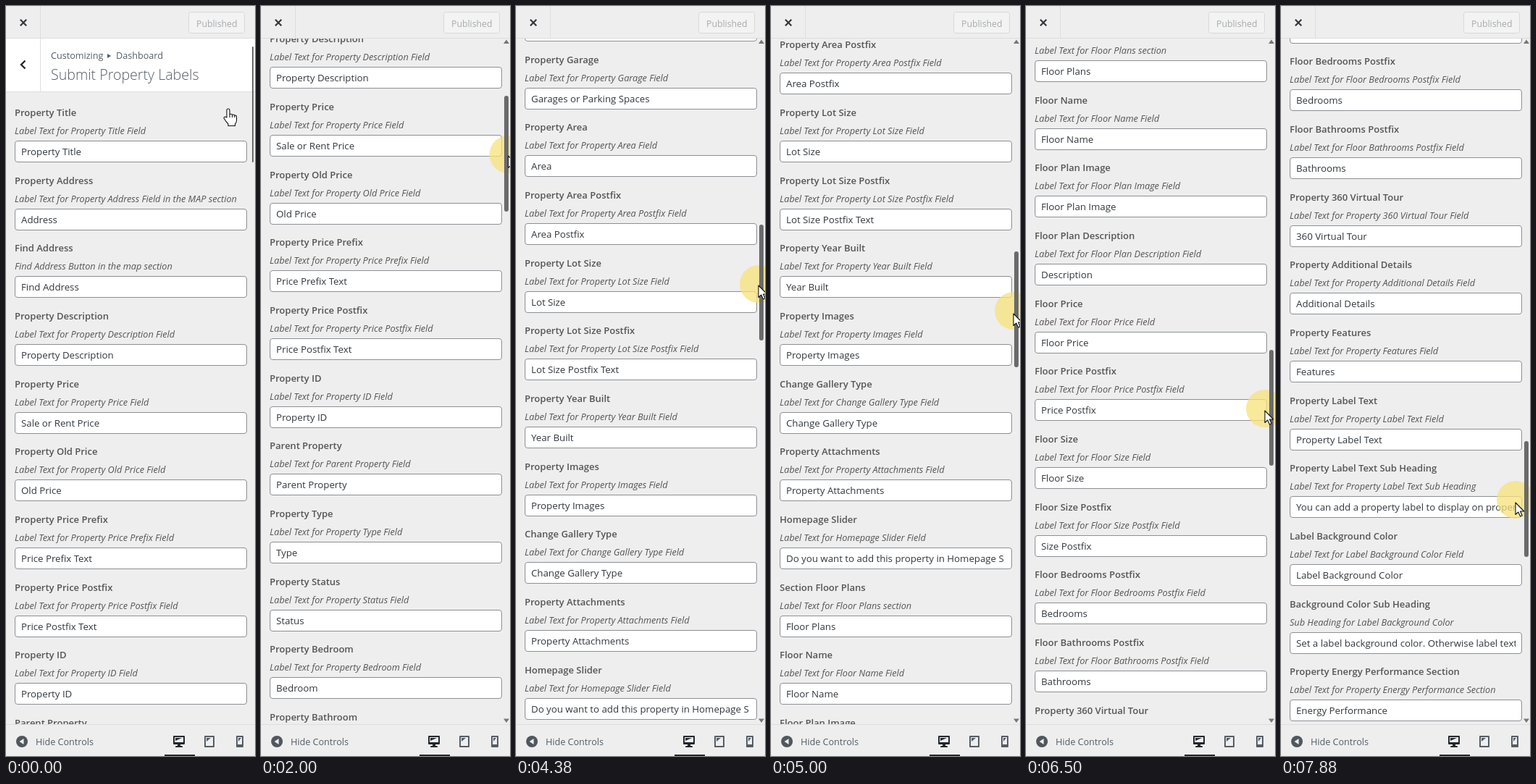
These frames come from a looping animation (344 px wide and 1036 px high, 8000 ms). An HTML page:

```html
<!DOCTYPE html>
<html lang="en">
<head>
<meta charset="utf-8">
<title>Label settings</title>
<style>
  html, body { margin: 0; width: 100%; height: 100%; overflow: hidden; background: #eee; }
  svg { display: block; font-family: "Open Sans", "Noto Sans", sans-serif; fill: #555d66; }
  .title { font-size: 13px; font-weight: 600; fill: #555; }
  .desc { font-size: 12.7px; font-style: italic; fill: #555; }
  .value { font-size: 13.25px; fill: #32373c; }
  .box { fill: #fff; stroke: #8c8f94; }
  .small { font-size: 12.6px; }
  .line { stroke: #ddd; fill: none; }
  .dark { fill: #23282d; }
  .halo { fill: #f7e27a; opacity: .75; }
  .cursor { fill: #fff; stroke: #111; stroke-width: 1.1; stroke-linejoin: round; }
</style>
</head>
<body>
<svg width="344" height="1036" viewBox="0 0 344 1036">
  <defs>
    <clipPath id="field"><rect x="13" y="187" width="311.5" height="28"/></clipPath>
  </defs>
  <rect width="344" height="1036" fill="#eee"/>
  <g id="list"></g>

  <g id="head">
    <rect y="44" width="344" height="74" fill="#fff"/>
    <path class="line" d="M0 118.5H344M47.5 44V118"/>
    <path d="M26.5 75.5L21 81L26.5 86.5" fill="none" stroke="#23282d" stroke-width="2.4"/>
    <text class="small" x="62" y="73">Customizing</text>
    <path d="M140 66L145 69L140 72Z"/>
    <text class="small" x="152" y="73">Dashboard</text>
    <text x="62" y="102" font-size="19.6" font-weight="300">Submit Property Labels</text>
  </g>

  <circle id="halo" class="halo" r="26"/>
  <g id="bar">
    <rect id="thumb" fill="#6a6a6a"/>
    <g id="arrows" fill="#777">
      <path d="M335 52L339 46.5L343 52Z"/>
      <path d="M335 984.5L339 990L343 984.5Z"/>
    </g>
  </g>

  <rect width="344" height="44" fill="#eee"/>
  <path class="line" d="M0 44.5H344M47.5 0V44"/>
  <path d="M19.8 18.8L28.2 27.2M28.2 18.8L19.8 27.2" stroke="#32373c" stroke-width="2.2"/>
  <rect x="252.5" y="8.5" width="77" height="29" rx="3" fill="#f3f3f3" stroke="#d8d8d8"/>
  <text x="263" y="28.5" font-size="12.3" fill="#a7aaad">Published</text>

  <rect y="992" width="344" height="44" fill="#eee"/>
  <path class="line" d="M0 992.5H344"/>
  <circle cx="22" cy="1016" r="8" fill="#50575e"/>
  <path d="M24.5 1012V1020L18.5 1016Z" fill="#eee"/>
  <text class="small" x="41" y="1021">Hide Controls</text>
  <g class="dark">
    <path fill-rule="evenodd" d="M232 1008H246Q247 1008 247 1009V1019Q247 1020 246 1020H241V1022H243Q244 1022 244 1024H234Q234 1022 235 1022H237V1020H232Q231 1020 231 1019V1009Q231 1008 232 1008ZM233 1010V1017H245V1010Z"/>
    <path d="M234 1011H243L234 1015Z"/>
    <rect x="219" y="1034" width="42" height="2"/>
  </g>
  <g fill="#555d66" fill-rule="evenodd">
    <path d="M275 1008H287Q288 1008 288 1009V1023Q288 1024 287 1024H275Q274 1024 274 1023V1009Q274 1008 275 1008ZM276 1010V1022H286V1010Z"/>
    <path d="M277 1011H283L277 1016Z"/>
    <path d="M319 1008H327Q328 1008 328 1009V1023Q328 1024 327 1024H319Q318 1024 318 1023V1009Q318 1008 319 1008ZM320 1010V1020H326V1010Z"/>
    <path d="M321 1011H325L321 1016Z"/>
  </g>

  <path id="hand" class="cursor" d="M-2 12V2a2 2 0 0 1 4 0V8a2 2 0 0 1 3.5 .6a2 2 0 0 1 3.3 .7a1.8 1.8 0 0 1 2.7 1.6V16q0 3-2 5v2.5H0V21q-3-3-6-8a1.8 1.8 0 0 1 3-1.5ZM2 8V12M5.5 8.6V12M8.8 9.3V12"/>
  <path id="arrow" class="cursor" d="M0 0V16.5L3.8 13L6.6 19L9.2 17.8L6.5 12H11.8Z"/>
</svg>
<script>
const NS = "http://www.w3.org/2000/svg";
const LOOP = 8000, STEP = 125;
const PITCH = 93.67, RATIO = 5.63;
const TRACK_TOP = 56, THUMB_H = 160;

// title | value (defaults to title) | description (defaults to "Label Text for ... Field")
const items = `Property Title
Property Address|Address|Label Text for Property Address Field in the MAP section
Find Address||Find Address Button in the map section
Property Description
Property Price|Sale or Rent Price
Property Old Price|Old Price
Property Price Prefix|Price Prefix Text
Property Price Postfix|Price Postfix Text
Property ID
Parent Property
Property Type|Type
Property Status|Status
Property Bedroom|Bedroom
Property Bathroom|Bathroom
Property Garage|Garages or Parking Spaces
Property Area|Area
Property Area Postfix|Area Postfix
Property Lot Size|Lot Size
Property Lot Size Postfix|Lot Size Postfix Text
Property Year Built|Year Built
Property Images
Change Gallery Type
Property Attachments
Homepage Slider|Do you want to add this property in Homepage S
Section Floor Plans|Floor Plans|Label Text for Floor Plans section
Floor Name
Floor Plan Image
Floor Plan Description|Description
Floor Price
Floor Price Postfix|Price Postfix
Floor Size
Floor Size Postfix|Size Postfix
Floor Bedrooms Postfix|Bedrooms
Floor Bathrooms Postfix|Bathrooms
Property 360 Virtual Tour|360 Virtual Tour
Property Additional Details|Additional Details
Property Features|Features
Property Label Text
Property Label Text Sub Heading|You can add a property label to display on property thumbnails.|Label Text for Property Label Text Sub Heading
Label Background Color
Background Color Sub Heading|Set a label background color. Otherwise label text|Sub Heading for Label Background Color
Property Energy Performance Section|Energy Performance|Label Text for Property Energy Performance Section`
  .split("\n").map(line => line.split("|"));

// time, scroll, pointer x, pointer y, halo y
const keys = [
  [0, 0, 307, 142, 142],
  [600, 0, 339, 140, 138],
  [2000, 382.8, 341.5, 207, 205],
  [3125, 844.5, 342, 290, 288],
  [4375, 1384.7, 335, 386, 384],
  [5625, 1818.7, 335, 468, 461],
  [6500, 2359, 330, 559, 556],
  [7875, 3068.1, 324, 686, 682]
];

const $ = id => document.getElementById(id);

function set(el, attrs) {
  for (const k in attrs) el.setAttribute(k, attrs[k]);
  return el;
}

function add(parent, tag, attrs, text) {
  const el = set(document.createElementNS(NS, tag), attrs);
  if (text) el.textContent = text;
  return parent.appendChild(el);
}

const move = (el, x, y) => set(el, { transform: `translate(${x} ${y})` });
const show = (el, on) => set(el, { visibility: on ? "visible" : "hidden" });

const rows = items.map(([title, value, desc]) => {
  const g = add($("list"), "g", {});
  add(g, "text", { class: "title", x: 12, y: 152 }, title);
  add(g, "text", { class: "desc", x: 12, y: 177 }, desc || `Label Text for ${title} Field`);
  add(g, "rect", { class: "box", x: 12.5, y: 186.5, width: 320, height: 29, rx: 3.5 });
  add(g, "text", { class: "value", x: 21, y: 206, "clip-path": "url(#field)" }, value || title);
  return g;
});

// Monotone cubic through the keys
const slope = (i, c) => (keys[i + 1][c] - keys[i][c]) / (keys[i + 1][0] - keys[i][0]);

function tangent(i, c) {
  if (i === 0) return slope(0, c);
  if (i === keys.length - 1) return slope(i - 1, c);
  const a = slope(i - 1, c), b = slope(i, c);
  return a * b <= 0 ? 0 : 2 * a * b / (a + b);
}

function at(t, c) {
  let i = 0;
  while (i < keys.length - 2 && t >= keys[i + 1][0]) i++;
  const h = keys[i + 1][0] - keys[i][0];
  const u = (t - keys[i][0]) / h, v = 1 - u;
  return v * v * (1 + 2 * u) * keys[i][c] + u * v * v * h * tangent(i, c)
    + u * u * (3 - 2 * u) * keys[i + 1][c] - u * u * v * h * tangent(i + 1, c);
}

function draw(time) {
  const t = Math.floor(time % LOOP / STEP) * STEP;
  const scroll = at(t, 1);

  rows.forEach((row, i) => {
    const y = Math.round(i * PITCH - scroll);
    show(row, y > -190 && y < 870);
    move(row, 0, y);
  });
  move($("head"), 0, -Math.min(80, Math.round(scroll)));

  const wide = t >= 500;
  set($("thumb"), {
    x: wide ? 336 : 340, y: TRACK_TOP + Math.round(scroll / RATIO),
    width: wide ? 6 : 2, height: THUMB_H, rx: wide ? 3 : 1
  });
  show($("arrows"), wide);

  const x = at(t, 2), y = Math.round(at(t, 3));
  show($("halo"), t >= 600 && (t < 2600 || t >= 3500));
  move($("halo"), x, at(t, 4));
  show($("hand"), !wide);
  show($("arrow"), wide);
  move($("hand"), x, y);
  move($("arrow"), x, y);
}

const start = performance.now();
function tick() {
  draw(performance.now() - start);
  requestAnimationFrame(tick);
}
tick();
</script>
</body>
</html>
```
